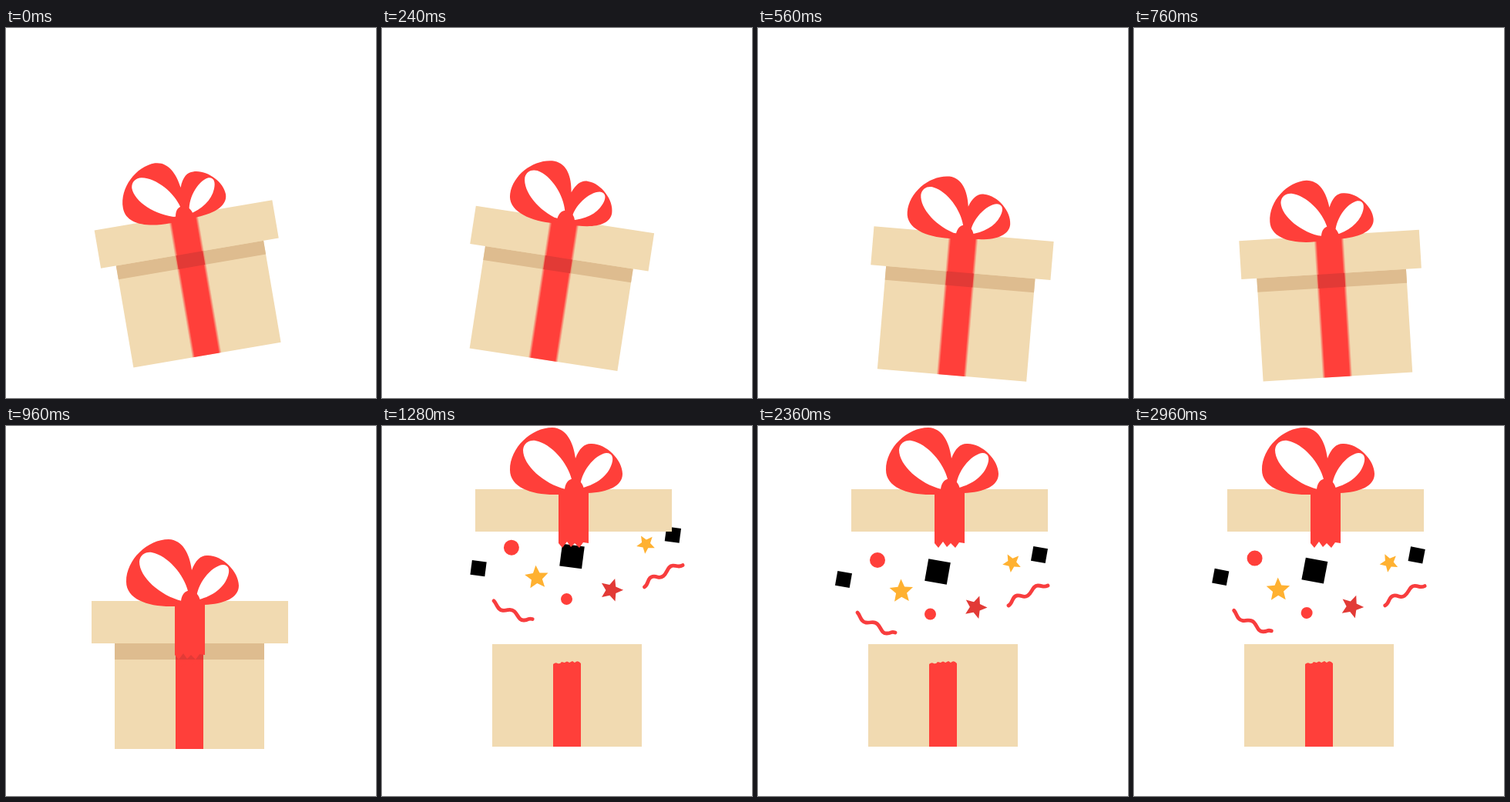
An HTML page that plays this animation: 480 px wide and 480 px high, repeating every 3 s.

```html
<!DOCTYPE html>
<html lang="en">
<head>
<meta charset="utf-8">
<title>Gift box</title>
<style>
  html, body { margin: 0; width: 100%; height: 100%; overflow: hidden; background: #fff; }
  svg { display: block; width: 100vw; height: 100vh; }
  .card { fill: #f1dab1; }
  .shade { fill: #debc8f; }
  .red { fill: #ff3f3a; }
  .deep { fill: #e23a36; }
  .gold { fill: #ffb131; }
  .line { fill: none; stroke: #f83d3e; stroke-width: 4.8; stroke-linecap: round; }
</style>
</head>
<body>
<svg viewBox="0 0 480 480">
  <defs>
    <linearGradient id="soft">
      <stop offset="0" stop-color="#ff3f3a" stop-opacity="0"/>
      <stop offset=".1" stop-color="#ff3f3a"/>
      <stop offset=".9" stop-color="#ff3f3a"/>
      <stop offset="1" stop-color="#ff3f3a" stop-opacity="0"/>
    </linearGradient>
    <g id="bow">
      <path class="red" d="M239 234H218C185 235 156 225 156 202C156 173 184 147 211 147C229 148 238 165 241 187C246 173 254 167 262 168C281 168 302 189 302 207C302 223 283 231 257 232Z"/>
      <path fill="#fff" d="M228 227C200 220 173 196 173 176C174 167 181 163 189 164C210 168 231 193 236 214Q229 219 228 227Z"/>
      <path fill="#fff" d="M247 226C247 205 266 182 281 180C290 180 291 188 287 197C281 212 265 222 247 226Z"/>
      <path class="red" d="M227 234V227C228 218 233 213 239 213.500C246 214 251 220 252 227V234Z"/>
    </g>
  </defs>

  <g id="shaking">
    <rect class="card" x="-97" y="-43" width="194" height="135"/>
    <rect class="shade" x="-97" y="-42" width="194" height="18"/>
    <rect class="card" x="-117" y="-92" width="234" height="50"/>
    <use href="#bow" transform="translate(-219 -300) scale(.92)"/>
    <rect x="-20" y="-92" width="39" height="184" fill="url(#soft)"/>
    <rect class="deep" x="-18" y="-42" width="35" height="18"/>
  </g>

  <g id="confetti">
    <circle class="red" cx="155" cy="174" r="10"/>
    <circle class="red" cx="223.500" cy="244" r="7.500"/>
    <path class="line" d="M129 242C133 246 133 254 140 255S150 252 155 257S160 269 167 269S172 266 178 268"/>
    <path class="line" d="M325 233C331 230 329 221 336 220S344 224 350 220S356 207 363 207S370 210 376 207"/>
  </g>

  <g id="body">
    <rect class="card" x="143" y="283" width="194" height="133"/>
    <g id="shadow">
      <rect class="shade" x="143" y="279" width="194" height="21"/>
      <rect class="deep" x="222" y="279" width="36" height="21"/>
      <rect class="red" x="222" y="300" width="36" height="12"/>
    </g>
    <path class="red" d="M222 416V309Q225 306 228 308Q231 309 233 306L237 307Q240 304 243 307L247 305L250 307Q254 303 258 308V416Z"/>
  </g>

  <g id="lid">
    <rect class="card" x="111" y="227" width="255" height="55"/>
    <use href="#bow"/>
    <path class="red" d="M219 229H258V297L251 296L246 303L240 297L235 302L230 295L224 303L219 297Z"/>
  </g>
</svg>
<script>
const LOOP = 3000, FRAME = 40, SHAKE_END = 880, LIFT = 960, LIFTED = 1160, POP = 1040;
const byId = id => document.getElementById(id);
const [shaking, confetti, body, shadow, lid] =
  ['shaking', 'confetti', 'body', 'shadow', 'lid'].map(byId);

function add(tag, attrs) {
  const node = document.createElementNS('http://www.w3.org/2000/svg', tag);
  for (const key in attrs) node.setAttribute(key, attrs[key]);
  confetti.append(node);
}

function star(x, y, radius, turn, cls) {
  const points = Array.from({ length: 10 }, (_, i) => {
    const a = (turn + i * 36 - 90) * Math.PI / 180;
    const r = i % 2 ? radius * 0.46 : radius;
    return [x + r * Math.cos(a), y + r * Math.sin(a)];
  });
  add('polygon', { points: points.join(' '), class: cls });
}

function square(x, y, size, turn) {
  add('rect', {
    x: x - size / 2, y: y - size / 2, width: size, height: size,
    transform: `rotate(${turn} ${x} ${y})`
  });
}

star(186, 214.5, 16, -2, 'gold');
star(329.5, 177.5, 12.5, -28, 'gold');
star(282, 235, 15.5, 20, 'deep');
square(111, 199, 19, 10);
square(233, 189, 29, 10);
square(365, 167, 19, 10);

// time, x, y, rotation, scale
const drift = [
  [1040, 6, 110, 0, 0.3],
  [1240, 13, -19, -2.4, 1],
  [1280, 14, -20, -2.6, 1],
  [1720, 8, -3, -0.8, 1],
  [2240, 0, 1, 0, 1],
  [2360, 0, 0, 0, 1],
  [2600, -2, 1, 0, 1],
  [3000, 1.3, -1.4, 0.8, 1]
];

function sample(keys, t) {
  const next = Math.max(1, keys.findIndex(k => k[0] > t));
  const a = keys[next - 1], b = keys[next];
  const p = Math.min(1, Math.max(0, (t - a[0]) / (b[0] - a[0])));
  const eased = (1 - Math.cos(Math.PI * p)) / 2;
  return a.slice(1).map((v, i) => v + (b[i + 1] - v) * eased);
}

const show = (node, on) => node.setAttribute('display', on ? 'inline' : 'none');
const place = (node, transform) => node.setAttribute('transform', transform);

function draw(t) {
  const shakingNow = t < SHAKE_END;
  show(shaking, shakingNow);
  show(body, !shakingNow);
  show(lid, !shakingNow);
  show(shadow, t <= LIFT);
  show(confetti, t >= POP);

  // The box circles quickly while it rocks about its own centre.
  const orbit = -72 * Math.PI / 180 - 2 * Math.PI * t / 203;
  const tilt = -9.7 * Math.cos(2 * Math.PI * t / 420);
  place(shaking, `translate(${239 + 21 * Math.cos(orbit)} ${353.5 + 21 * Math.sin(orbit)}) rotate(${tilt})`);

  const lift = Math.min(1, Math.max(0, (t - LIFT) / (LIFTED - LIFT)));
  place(lid, `translate(${10 * lift} ${-145 * lift})`);
  place(body, t <= LIFT ? 'translate(-2 3)' : '');

  const [x, y, turn, scale] = sample(drift, t);
  place(confetti, `translate(${235 + x} ${200 + y}) rotate(${turn}) scale(${scale}) translate(-235 -200)`);
}

const start = performance.now();
function tick() {
  const t = (performance.now() - start) % LOOP;
  draw(Math.floor(t / FRAME) * FRAME);
  requestAnimationFrame(tick);
}
tick();
</script>
</body>
</html>
```
